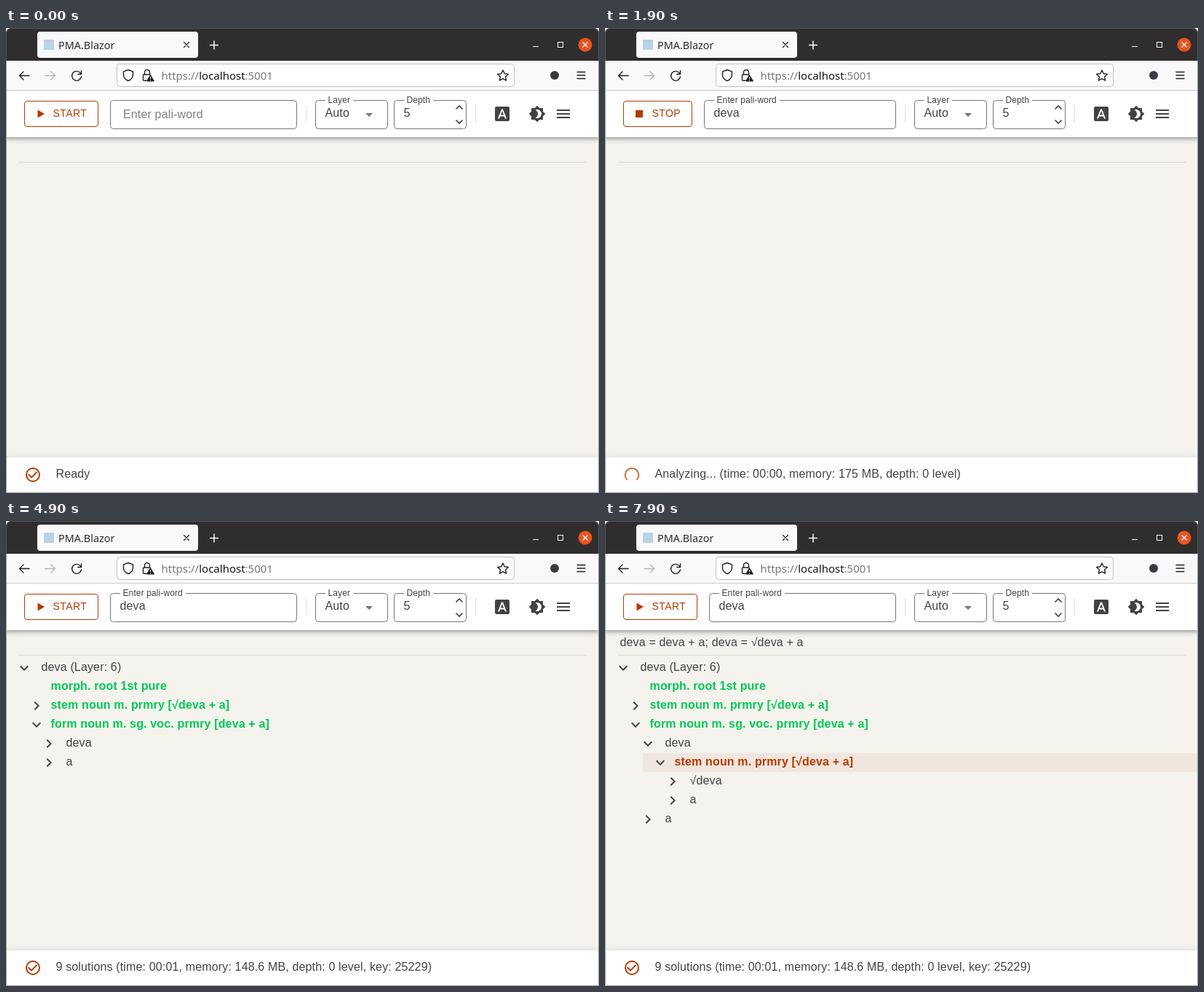
Animation of 815 by 639 pixels, one loop 8 s. Source, as an HTML page:

```html
<!DOCTYPE html>
<html lang="en">
<head>
<meta charset="utf-8">
<title>Word analysis</title>
<style>
  html, body { margin: 0; width: 100%; height: 100%; overflow: hidden; background: #fff; }
  #stage {
    --ink: #424242; --brand: #b53a00; --ok: #00c853; --edge: #757575;
    position: absolute; left: 0; top: 0; width: 815px; height: 639px;
    overflow: hidden; background: #f4f3ee; border-radius: 7px 7px 0 0;
  }
  .bar {
    position: absolute; left: 0; width: 815px; background: #fff;
    box-shadow: 0 2px 4px -1px rgba(0,0,0,.2), 0 4px 5px rgba(0,0,0,.14), 0 1px 10px rgba(0,0,0,.12);
  }
  svg { position: absolute; left: 0; top: 0; }
  text { font: 16px "Liberation Sans", Arial, sans-serif; letter-spacing: .15px; fill: var(--ink); white-space: pre; }
  .small { font-size: 12px; letter-spacing: .11px; }
  .button { font-size: 14px; letter-spacing: .4px; fill: var(--brand); }
  .bold { font-weight: 700; fill: var(--ok); }
  .hint { fill: #80827b; }
  .brand, .bold.brand { fill: var(--brand); }
  .chrome { font-family: "Noto Sans", "Open Sans", sans-serif; letter-spacing: 0; }
  .ink { fill: var(--ink); }
  .line { fill: none; stroke: #1f1e24; stroke-width: 1.4; stroke-linecap: round; stroke-linejoin: round; }
</style>
</head>
<body>
<div id="stage">
  <div class="bar" style="top:86px;height:64px"></div>
  <div class="bar" style="top:590px;height:49px"></div>
  <svg width="815" height="639">
    <g id="window">
      <rect width="815" height="45" fill="#302d2e"/>
      <rect x="43" y="5" width="221" height="36" rx="4" fill="#f9f9fb"/>
      <rect x="52" y="16" width="14" height="14" fill="#b8d2e6"/>
      <text class="chrome" x="72" y="28.5" style="font-size:14.4px;fill:#2b2a33">PMA.Blazor</text>
      <path class="line" style="stroke-width:1.2" d="M244.5 19.5l7 7m0-7l-7 7"/>
      <path d="M280 23.5h12M286 17.5v12" stroke="#fff" stroke-width="1.5"/>
      <path d="M724 25.5h8" stroke="#fff"/>
      <rect x="758.5" y="19.5" width="7" height="7" fill="none" stroke="#fff"/>
      <circle cx="796" cy="23" r="9.5" fill="#e95420"/>
      <path d="M792.5 19.5l7 7m0-7l-7 7" stroke="#fff" stroke-width="1.3"/>

      <rect y="45" width="815" height="41" fill="#f9f9fb"/>
      <path d="M0 85.5h815" stroke="#ccccd0"/>
      <path class="line" d="M32 65.5H18.5m5.5-5.5l-5.5 5.5 5.5 5.5"/>
      <path class="line" style="stroke:#b5b4b8" d="M54 65.5h13.5m-5.5-5.5l5.5 5.5-5.5 5.5"/>
      <path class="line" d="M102.5 62.2a6.5 6.5 0 1 0 1 4.8M103.5 58.8v4.7h-4.7"/>
      <rect x="152.500" y="49.500" width="546" height="31" rx="4" fill="#fff" stroke="#bfbfc5"/>
      <path class="line" d="M168 57.500l6.500 2.300v4.200c0 4-2.600 7-6.500 8.700-3.900-1.700-6.500-4.700-6.500-8.700v-4.200z"/>
      <path class="line" d="M190.500 64v-3a3.500 3.500 0 0 1 7 0v3M193 72.300h-3.500a1 1 0 0 1-1-1V65a1 1 0 0 1 1-1h8.500"/>
      <path d="M198.500 64.500l5 8.500h-10z" fill="#1f1e24" stroke="#1f1e24" stroke-linejoin="round"/>
      <path d="M198.500 67v3m0 1v1.200" stroke="#fff"/>
      <text class="chrome" x="213.500" y="71" style="font-size:15px;fill:#77767c">https://<tspan fill="#15141a">localhost</tspan>:5001</text>
      <polygon id="star" class="line"/>
      <circle cx="754" cy="65" r="6" fill="#3b3a42"/>
      <path class="line" style="stroke-width:1.300" d="M785 60.500h11m-11 4.500h11m-11 4.500h11"/>
    </g>
    <g id="tools">
      <path d="M412.500 106v24M645.500 106v24" stroke="#e2e1de"/>
      <path d="M494 117h10l-5 5z" fill="#757575"/>
      <path d="M618.500 111.500l4.500-4.500 4.500 4.500M618.500 126.500l4.500 4.500 4.500-4.500" fill="none" stroke="#424242" stroke-width="1.700"/>
      <path class="ink" transform="translate(670 106)" d="M9.930 13.500h4.140L12 7.980zM20 2H4c-1.100 0-2 .9-2 2v16c0 1.100.9 2 2 2h16c1.100 0 2-.9 2-2V4c0-1.100-.9-2-2-2zm-4.050 16.500l-1.140-3H9.170l-1.120 3H5.960l5.110-13h1.860l5.110 13z"/>
      <path class="ink" transform="translate(718 106)" d="M20 8.690V4h-4.690L12 .69 8.690 4H4v4.690L.69 12 4 15.310V20h4.690L12 23.310 15.310 20H20v-4.690L23.310 12zM12 18c-.89 0-1.740-.2-2.500-.55C11.560 16.500 13 14.420 13 12s-1.440-4.500-3.500-5.450C10.260 6.200 11.110 6 12 6c3.310 0 6 2.690 6 6s-2.690 6-6 6z"/>
      <path d="M757 113h18m-18 5h18m-18 5h18" stroke="#424242" stroke-width="2"/>
      <path d="M17 184.500h781" stroke="#dcdad6"/>
    </g>
    <g id="live"></g>
    <path d="M.5 45V638.500H814.500V45" fill="none" stroke="#a3a2a2"/>
    <path d="M.5 45V7.500a7 7 0 0 1 7-7H807.500a7 7 0 0 1 7 7V45" fill="none" stroke="#565354"/>
  </svg>
</div>
<script>
const LOOP = 8000;
const live = document.getElementById('live');

const text = (x, y, s, cls = '') => `<text x="${x}" y="${y}" class="${cls}">${s}</text>`;

const field = (x, width, label, notch, value, focused) => {
  const w = focused ? 2 : 1, half = w / 2;
  const border = `<rect x="${x + half}" y="${99 + half}" width="${width - w}" height="${40 - w}" rx="4"
    fill="none" stroke="var(--${focused ? 'brand' : 'edge'})" stroke-width="${w}"/>`;
  if (!value) return border + text(x + 18, 124, label, 'hint');
  return border + `<rect x="${x + 14}" y="98" width="${notch}" height="4" fill="#fff"/>`
    + text(x + 17.5, 103, label, focused ? 'small brand' : 'small')
    + text(x + 13.5, 122, value);
};

const button = running => `<rect x="25.5" y="100.5" width="${running ? 94 : 101}" height="35" rx="3.5"
    fill="none" stroke="var(--brand)"/>`
  + `<path class="brand" d="${running ? 'M42 113h10v10h-10z' : 'M43.5 112.500l9.500 5.500-9.500 5.500z'}"/>`
  + text(64.5, 122, running ? 'STOP' : 'START', 'button');

const statusIcon = running => running
  ? '<path d="M30.500 621a9.300 9.300 0 1 1 13 0" fill="none" stroke="#cd6c3f" stroke-width="2"/>'
  : '<circle cx="37" cy="614" r="9" fill="none" stroke="var(--brand)" stroke-width="2"/>'
    + '<path d="M30.700 613.300l4.300 4.300 7.300-7.300" fill="none" stroke="var(--brand)" stroke-width="2"/>';

// A row is [level, text, state]; state: open, closed or leaf. Green rows are solutions.
const treeRow = ([level, label, state, selected], i) => {
  const x = 25 + 17 * level, y = 202 + 26 * i;
  const solution = /^(morph|stem|form)/.test(label);
  const back = selected ? `<rect x="${x - 24}" y="${y - 13}" width="${838 - x}" height="26" fill="#f1e6de"/>` : '';
  const arrow = state === 'leaf' ? ''
    : `<path class="ink" transform="translate(${x} ${y}) rotate(${state === 'open' ? 90 : 0})"
        d="M-2-6l-1.410 1.410L1.170 0l-4.580 4.590L-2 6l6-6z"/>`;
  const cls = solution ? (selected ? 'bold brand' : 'bold') : '';
  return back + arrow + text(x + (solution ? 19.5 : 23.5), y + 4, label, cls);
};

const stem = 'stem noun m. prmry [√deva + a]';
const form = 'form noun m. sg. voc. prmry [deva + a]';
const root = state => [0, 'deva (Layer: 6)', state];
const solutions = state => [root('open'), [1, 'morph. root 1st pure', 'leaf'], [1, stem, 'closed'], [1, form, state]];
const parts = (state, selected) => [
  ...solutions('open'),
  [2, 'deva', 'open'],
  [3, stem, state, selected],
  ...(state === 'open' ? [[4, '√deva', 'closed'], [4, 'a', 'closed']] : []),
  [2, 'a', 'closed']
];
const done = '9 solutions (time: 00:01, memory: 148.6 MB, depth: 0 level, key: 25229)';

// Each step changes only the listed properties.
const steps = [
  [0, { word: '', focused: false, running: false, status: 'Ready', rows: [], formula: '' }],
  [1000, { word: 'd', focused: true }],
  [1200, { word: 'de' }],
  [1400, { word: 'dev' }],
  [1600, { word: 'deva' }],
  [1800, { focused: false }],
  [1900, { running: true, status: 'Analyzing... (time: 00:00, memory: 175 MB, depth: 0 level)' }],
  [2900, { running: false, status: done, rows: [root('closed')] }],
  [3900, { rows: solutions('closed') }],
  [4900, { rows: [...solutions('open'), [2, 'deva', 'closed'], [2, 'a', 'closed']] }],
  [5900, { rows: parts('closed') }],
  [6900, { rows: parts('open') }],
  [7900, { rows: parts('open', true), formula: 'deva = deva + a; deva = √deva + a' }]
];

const draw = s => {
  const x = s.running ? 136 : 143;
  live.innerHTML = button(s.running)
    + field(x, 400 - x, 'Enter pali-word', 90, s.word, s.focused)
    + field(425, 100, 'Layer', 38, 'Auto')
    + field(533, 100, 'Depth', 40, '5')
    + text(20.5, 172, s.formula)
    + s.rows.map(treeRow).join('')
    + statusIcon(s.running) + text(68.5, 618, s.status);
};

const starPoints = Array.from({ length: 10 }, (_, i) => {
  const r = i % 2 ? 3.8 : 7.8, a = i * Math.PI / 5;
  return `${683 + r * Math.sin(a)},${65.8 - r * Math.cos(a)}`;
});
document.getElementById('star').setAttribute('points', starPoints.join(' '));

let shown = -1;
const start = performance.now();
const tick = () => {
  const t = (performance.now() - start) % LOOP;
  const step = steps.filter(([at]) => at <= t).length;
  if (step !== shown) {
    shown = step;
    draw(Object.assign({}, ...steps.slice(0, step).map(([, change]) => change)));
  }
  requestAnimationFrame(tick);
};
tick();
</script>
</body>
</html>
```
